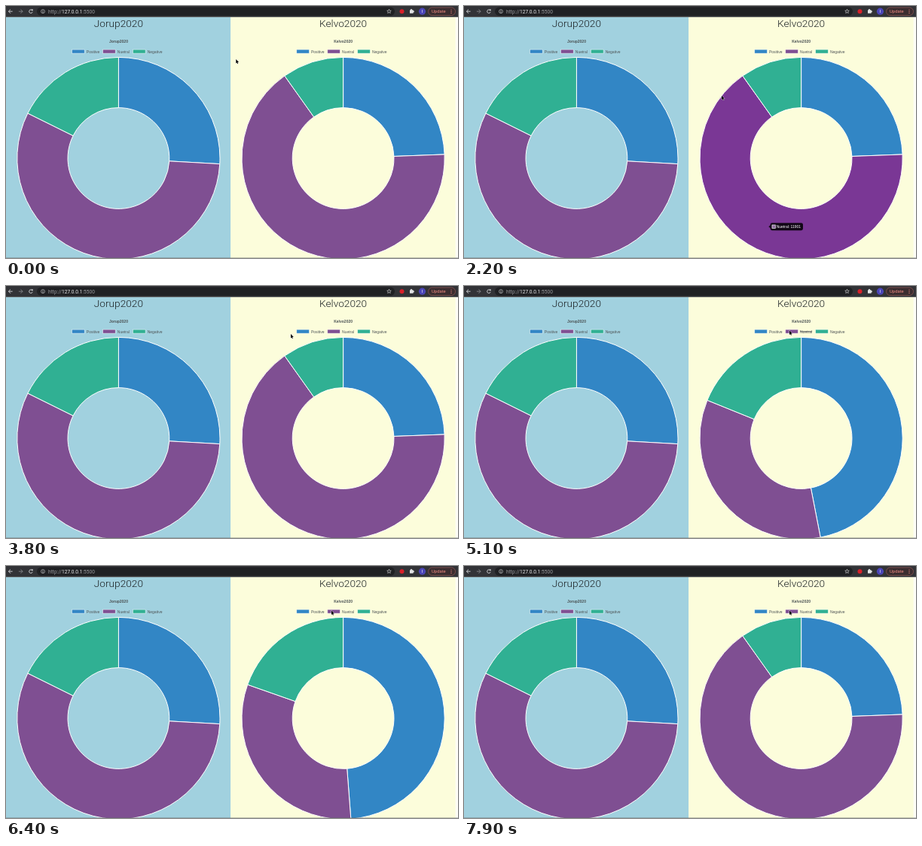
Write an HTML page with a canvas that moves like this. It is 600 px wide and 336 px high and loops after 8 s.

```html
<!DOCTYPE html>
<html lang="en">
<head>
<meta charset="utf-8">
<style>
html, body { margin: 0; width: 100%; height: 100%; overflow: hidden; }
canvas { display: block; width: 600px; height: 336px; }
</style>
</head>
<body>
<canvas id="stage"></canvas>
<script>
const LOOP = 8000, TAU = Math.PI * 2;
const BLUE = '#3286c5', PURPLE = '#7f4f92', GREEN = '#30b093';
const COLORS = [BLUE, PURPLE, GREEN];
const LABELS = ['Positive', 'Nuetral', 'Negative'];
const SANS = '"Liberation Sans", Arial, sans-serif';
const ROBOTO = 'Roboto, sans-serif';
const LEFT = [0.259, 0.5645, 0.1765];
const RIGHT = [0.244, 0.658, 0.098];
const HIDE_AT = 4950, SHOW_AT = 6250;
const HOVER_IN = 1100, HOVER_OUT = 2250;
// Pointer stops: time, x, y
const POINTER = [[0, 305.3, 71], [600, 305.3, 71], [1300, 345, 155], [1800, 350, 150],
  [2200, 342, 119.5], [3000, 361, 82], [3800, 378, 64], [4700, 432, 59.5]];

const canvas = document.getElementById('stage');
const scale = window.devicePixelRatio || 1;
canvas.width = 600 * scale;
canvas.height = 336 * scale;
const c = canvas.getContext('2d');
c.scale(scale, scale);

const clamp = v => Math.min(1, Math.max(0, v));
const mix = (a, b, p) => a + (b - a) * p;
const outQuart = p => 1 - (1 - clamp(p)) ** 4;

function rect(x, y, w, h, color, r = 0) {
  c.beginPath();
  c.roundRect(x, y, w, h, r);
  c.fillStyle = color;
  c.fill();
}

function disc(x, y, r, color) {
  c.beginPath();
  c.arc(x, y, r, 0, TAU);
  c.fillStyle = color;
  c.fill();
}

function text(s, x, y, font, color, align = 'left') {
  c.font = font;
  c.fillStyle = color;
  c.textAlign = align;
  c.fillText(s, x, y);
  return c.measureText(s).width;
}

function line(points, color, width = 0.9) {
  c.beginPath();
  points.forEach(([x, y]) => c.lineTo(x, y));
  c.strokeStyle = color;
  c.lineWidth = width;
  c.stroke();
}

function arrow(x, dir, color) {
  line([[x - 2.6, 7.2], [x + 2.6, 7.2]], color);
  line([[x, 4.6], [x + 2.6 * dir, 7.2], [x, 9.8]], color);
}

function star(x, y) {
  c.beginPath();
  for (let i = 0; i < 10; i++) {
    const r = i % 2 ? 1.3 : 2.9, a = i * TAU / 10;
    c.lineTo(x + r * Math.sin(a), y - r * Math.cos(a));
  }
  c.closePath();
  c.strokeStyle = '#c6c7c9';
  c.lineWidth = 0.7;
  c.stroke();
}

function toolbar() {
  const light = '#d4d5d8';
  rect(0, 0, 600, 14.7, '#323337');
  rect(41, 1.6, 475, 11.4, '#202124', 5.7);
  arrow(6, -1, light);
  arrow(19.5, 1, '#85868a');
  c.beginPath();
  c.arc(33, 7.2, 2.3, 0.3, 5.4);
  c.strokeStyle = light;
  c.lineWidth = 0.9;
  c.stroke();
  rect(33.8, 4.4, 1.9, 1.9, light);

  c.beginPath();
  c.arc(49, 7.2, 2.5, 0, TAU);
  c.lineWidth = 0.6;
  c.stroke();
  rect(48.6, 5.6, 0.8, 0.8, light);
  rect(48.6, 6.9, 0.8, 1.8, light);

  let x = 56;
  for (const [s, color] of [['http://', '#9a9b9f'], ['127.0.0.1', '#eeeeef'], [':5500', '#9a9b9f']])
    x += text(s, x, 9.5, '6.6px ' + ROBOTO, color);

  star(508.5, 7.2);
  disc(525.5, 7.2, 3, '#d8202a');
  rect(536, 5.2, 4.6, 4.6, '#e4e5e7', 0.6);
  disc(538, 5, 1.1, '#e4e5e7');
  disc(540.8, 7.4, 1.1, '#e4e5e7');
  disc(552.5, 7.2, 4.6, '#4b45b8');
  text('I', 552.5, 9.3, '5.8px ' + ROBOTO, '#fff', 'center');

  c.beginPath();
  c.roundRect(560.5, 2, 36, 10.6, 5.3);
  c.fillStyle = '#3b2d30';
  c.fill();
  c.strokeStyle = '#a5605c';
  c.lineWidth = 0.6;
  c.stroke();
  text('Update', 565, 9.3, '5.9px ' + ROBOTO, '#f28b82');
  for (const y of [5, 7.2, 9.4]) disc(591, y, 0.6, '#f28b82');
}

function donut(cx, shares, colors) {
  const cy = 203, sum = shares.reduce((a, b) => a + b);
  let a = -TAU / 4;
  shares.forEach((share, i) => {
    const end = a + share / sum * TAU;
    if (share > 0.0005) {
      c.beginPath();
      c.arc(cx, cy, 134.6, a, end);
      c.arc(cx, cy, 67.4, end, a, true);
      c.closePath();
      c.fillStyle = colors[i];
      c.fill();
      c.strokeStyle = '#fff';
      c.lineWidth = 1;
      c.stroke();
    }
    a = end;
  });
}

function panel(x, bg, name, shares, colors, struck) {
  const mid = x + 149.4;
  rect(x, 14.7, 298.4, 322, bg);
  text(name, mid, 28.4, '300 13.7px ' + ROBOTO, '#1d2326', 'center');
  text(name, mid, 48.9, 'bold 5px ' + SANS, '#4c5355', 'center');
  LABELS.forEach((label, i) => {
    const bx = x + [87.6, 128.6, 168.5][i];
    rect(bx, 58.1, 16.6, 5, COLORS[i]);
    c.strokeStyle = 'rgba(255,255,255,.75)';
    c.lineWidth = 0.6;
    c.strokeRect(bx, 58.1, 16.6, 5);
    const w = text(label, bx + 19.2, 62.5, '5px ' + SANS, '#4f5557');
    if (struck && i === 1) line([[bx + 19.2, 60.7], [bx + 19.2 + w, 60.7]], '#4f5557', 0.8);
  });
  donut(mid, shares, colors);
}

function tooltip(alpha) {
  c.globalAlpha = alpha;
  c.beginPath();
  c.roundRect(406.6, 289.2, 43.4, 10, 2.4);
  c.moveTo(406.7, 292.1);
  c.lineTo(404.4, 294.2);
  c.lineTo(406.7, 296.3);
  c.fillStyle = 'rgba(12,5,15,.95)';
  c.fill();
  rect(408.6, 291.6, 5.1, 5.1, '#fff');
  rect(409.3, 292.3, 3.7, 3.7, '#8f6aa0');
  text('Nuetral: 11901', 414.7, 296, '5px ' + SANS, '#fff');
  c.globalAlpha = 1;
}

function pointer(t) {
  let i = POINTER.findLastIndex(p => p[0] <= t);
  const [t0, x0, y0] = POINTER[i];
  const [t1, x1, y1] = POINTER[i + 1] || [LOOP, x0, y0];
  const p = (t - t0) / (t1 - t0), e = p * p * (3 - 2 * p);
  c.save();
  c.translate(mix(x0, x1, e), mix(y0, y1, e));
  c.beginPath();
  for (const [x, y] of [[0, 0], [0, 5.4], [1.2, 4.4], [2, 6.2], [2.9, 5.8], [2.1, 4], [3.8, 4]])
    c.lineTo(x, y);
  c.closePath();
  c.strokeStyle = 'rgba(255,255,255,.8)';
  c.lineWidth = 0.9;
  c.stroke();
  c.fillStyle = '#000';
  c.fill();
  c.restore();
}

function draw(t) {
  const hidden = t < SHOW_AT ? outQuart((t - HIDE_AT) / 1000) : 1 - outQuart((t - SHOW_AT) / 1000);
  const [pos, neu, neg] = RIGHT, shown = pos + neg;
  const shares = [mix(pos, pos / shown, hidden), neu * (1 - hidden), mix(neg, neg / shown, hidden)];
  const hover = Math.min(clamp((t - HOVER_IN) / 200), clamp((HOVER_OUT + 200 - t) / 200));
  const lit = `rgb(${mix(127, 122, hover)},${mix(79, 55, hover)},${mix(146, 149, hover)})`;

  rect(0, 0, 600, 336, '#fdfdf6');
  panel(0, '#a1d1df', 'Jorup2020', LEFT, COLORS, false);
  panel(298.2, '#fcfddb', 'Kelvo2020', shares, [BLUE, lit, GREEN], t >= HIDE_AT && t < SHOW_AT);
  toolbar();
  rect(0, 335.3, 600, 0.7, 'rgba(90,95,95,.45)');
  if (hover > 0) tooltip(hover);
  pointer(t);
}

function tick() {
  draw(performance.now() % LOOP);
  requestAnimationFrame(tick);
}
tick();
</script>
</body>
</html>
```
